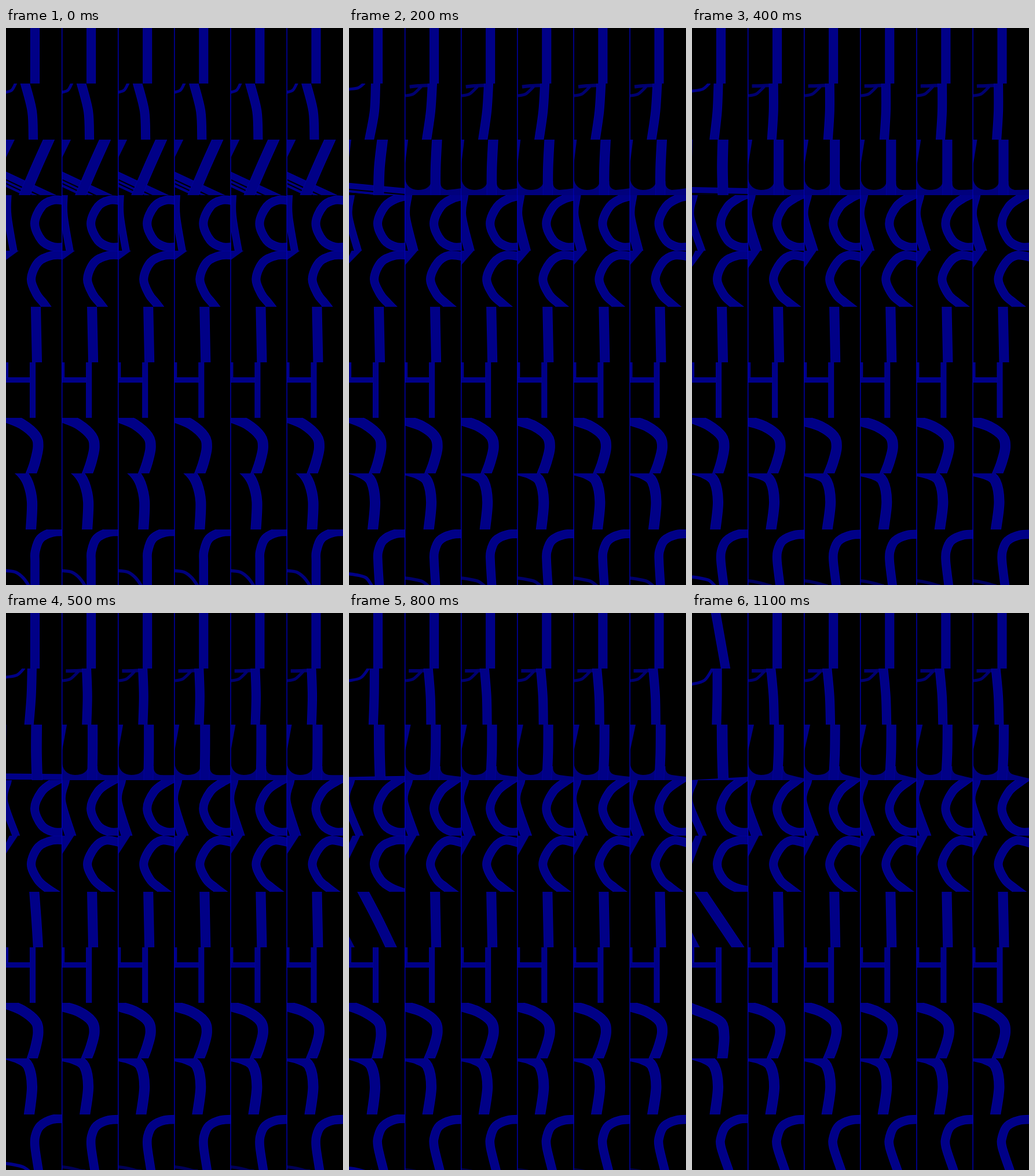
Recreate the animation shown at these times as an HTML page with a canvas. Size 582 by 963 pixels, loop 1.2 s.

```html
<!DOCTYPE html>
<html lang="en">
<head>
<meta charset="utf-8">
<title>Road tiles</title>
<style>
html, body { margin: 0; width: 100%; height: 100%; overflow: hidden; background: #000; }
canvas { display: block; width: 582px; height: 963px; }
</style>
</head>
<body>
<canvas id="stage" width="582" height="963"></canvas>
<script>
const ctx = document.getElementById('stage').getContext('2d');
const COLS = 6, CELL_W = 97.1, CELL_H = 96.3;
const STEP_MS = 100, STEPS = 12;
const BODY = '#000087', EDGE = '#00009c', DIM = '#00007c';
const FAST = 1, MEDIUM = 1.5, SLOW = 4; // settling times, in steps

let step = 0;
let real = true; // the first column moves freely, the others follow more stiffly

const pick = (free, stiff) => real ? free : stiff;

// Decays to a resting value; a kick makes it swing past on the way.
const settle = (from, to, time = MEDIUM, kick = 0) =>
  to + (from - to + kick * step) * Math.exp(-step / time);

const mix = (a, b, f) => a + (b - a) * f;

function smooth(start, length) {
  const u = Math.min(1, Math.max(0, (step - start) / length));
  return u * u * (3 - 2 * u);
}

// Smooth curve through the points.
function trace(p) {
  ctx.beginPath();
  ctx.moveTo(...p[0]);
  for (let i = 0; i < p.length - 1; i++) {
    const a = p[i - 1] || p[i], b = p[i], c = p[i + 1], d = p[i + 2] || c;
    ctx.bezierCurveTo(
      b[0] + (c[0] - a[0]) / 6, b[1] + (c[1] - a[1]) / 6,
      c[0] - (d[0] - b[0]) / 6, c[1] - (d[1] - b[1]) / 6, c[0], c[1]);
  }
}

function line(width, color, ...p) {
  trace(p);
  ctx.lineWidth = width;
  ctx.strokeStyle = color;
  ctx.stroke();
}

function road(width, ...p) {
  line(width, EDGE, ...p);
  line(width - 2, BODY, ...p);
}

// Road from top to bottom edge, running on past both.
function column(width, top, mid, low) {
  road(width, [top - (mid - top) * .2, -10], [top, 0], [mid, 48],
    [low, 96], [low + (low - mid) * .2, 106]);
}

function fill(color, path) {
  ctx.fillStyle = color;
  ctx.fill(new Path2D(path));
}

function soft(alpha, draw) {
  ctx.save();
  ctx.globalAlpha = alpha;
  ctx.filter = 'blur(0.7px)';
  draw();
  ctx.restore();
}

function straight() {
  const turn = pick(smooth(10, 1), 0);
  const top = mix(50, 41, turn), low = mix(50, 58, turn);
  column(16, top, (top + low) / 2, low);
}

function branch() {
  const x = settle(17, 29 + step * .65), y = settle(15, 5 + step * 2, FAST);
  const arc = (w, color) =>
    line(w, color, [-6, y + 1], [0, y], [x * .6, y * .75], [x, -1]);
  if (real || step === 0) {
    arc(5, BODY);
  } else {
    soft(.9, () => {
      line(6, DIM, [settle(12, 6), settle(10, 4)], [22, 4], [42, 3]);
      line(5, DIM, [0, 21], [14, 18], [28, 5]);
    });
  }
  column(16,
    pick(settle(33, 43.5, MEDIUM, 10), settle(33, 39, MEDIUM, 18)),
    settle(45, 43.5),
    pick(settle(47, 42.5, MEDIUM, -16), settle(47, 45, MEDIUM, -16)));
}

function crossing() {
  const side = pick(settle(15, 0), settle(15, 10, MEDIUM, -12));
  fill(BODY, `M0 0H${side}L0 ${pick(31, settle(31, 45))}Z`);
  if (real || step === 0) {
    const left = settle(68.5, 82 + step * 1.6, FAST);
    const right = settle(114, 94.5, 2, -13);
    const rise = (right - left) * .1;
    road(settle(24, 7, 3.3), [-10, left - rise], [107, right + rise]);
    for (const gap of [1 + step, 7.5 + step]) {
      line(2, '#000', [0, left + gap], [97, right + gap]);
    }
  } else {
    soft(1, () => fill(DIM, `M0 68Q3 86 22 87Q42 87 45 72H61
      Q60 85 72 87Q85 ${85 + step / 2} 97 ${82 + step}V98H0Z`));
  }
  column(pick(18.5, settle(18.5, 17)),
    pick(settle(74, 52), settle(74, 53, MEDIUM, -7)), 52.5,
    pick(settle(32, 54, FAST), settle(32, 50, MEDIUM, 13)));
}

function upperRing() {
  const foot = settle(13, pick(19, 15), SLOW);
  road(pick(13, settle(13, 19)), [5, -8], [3, 2],
    [settle(3, -6, SLOW), 36], [foot, 96], [foot + 3, 106]);
  road(15, [104, settle(10, -14, SLOW)], [82, settle(8.5, 2, SLOW)],
    [61.7, 19.7], [49.5, 49], [61.7, 78.3], [82, 89.5], [104, 89]);
}

function lowerRing() {
  const wide = 22 - step * .3;
  fill(BODY, `M0 0H${wide}L0 ${pick(16 + step * 3, settle(16, 38, SLOW))}Z`);
  if (real) fill('#000', `M0 0H${settle(0, 6)}L0 ${settle(0, 13)}Z`);
  const corner = pick([55.7, 19.7], [settle(55.7, 56), settle(19.7, 21)]);
  road(15, [104, pick(8, settle(8, 15, SLOW))], [pick(80, settle(80, 75)), 8],
    corner, [43.5, 49], [settle(53, 54.5), 75.5],
    [pick(64 + step, settle(64, 70)), 89.5],
    [pick(78 + step * 2.3, settle(78, 91)), pick(109 - step * 1.2, settle(108, 105))]);
}

function lean() {
  const swing = pick(smooth(4, 6), 0);
  const top = mix(51.5, 15, swing), low = mix(53.5, 79.5, swing);
  column(mix(17, 18.5, swing), top, mix(52.5, (top + low) / 2, swing), low);
  fill(BODY, `M0 ${mix(97, 70, swing)}L${14 * swing} 97H0Z`);
}

function ladder() {
  road(10, [-1, -5], [-1, 35]);
  road(9, [-5, 30.5], [45, 30.5]);
  road(10, [46, -5], [46, 102]);
}

function bow() {
  const sag = (step / (STEPS - 1)) ** 2;
  const start = pick(mix(-1, 10, sag), settle(-1, 6));
  const shoulder = pick(mix(11, 21, sag), settle(11, 15));
  const low = pick(mix(43, 52, sag), settle(43, 41, SLOW));
  const drop = pick(sag, .2);
  road(18, [-10, start - 4], [0, start], [28, shoulder], [51, 31 + 4 * drop],
    [55.5, 50 + 7 * drop], [(55 + low) / 2 + 1, 77], [low, 97], [low - 4, 106]);
}

function bend() {
  const x = settle(10, 0, FAST), y = settle(-14, pick(-7, -4), FAST);
  const elbow = settle(18, 13.5, FAST), low = settle(43, pick(39.5, 38.5), 2.5);
  road(18, [x - 8, y - 1], [x, y], [(x + 38) / 2 + 3, (y + elbow) / 2 - 3],
    [38.5, elbow], [45, 49], [low, 97], [low - 1, 106]);
}

function hook() {
  const low = 50 + step * 1.2;
  const rise = pick(71.5 + step * 2.7, settle(71.5, 83 + step * 1.6, FAST));
  const arc = () => line(5.5, pick(BODY, DIM),
    [-5, rise], [2, rise], [17, rise + 2.5], [30, Math.max(rise + 6, 84)], [40, 98]);
  if (real) arc();
  else soft(1 - step * .06, arc);
  const start = settle(4, pick(7.5, 9));
  road(15.5, [106, start - .5], [80, start + 1], [59, settle(16, 20)],
    [50.5, 38], [50, 56], [low, 96], [low + (low - 50) * .25, 106]);
}

const rows = [straight, branch, crossing, upperRing, lowerRing, lean, ladder, bow, bend, hook];

function render() {
  step = Math.floor(performance.now() / STEP_MS) % STEPS;
  ctx.fillStyle = '#000';
  ctx.fillRect(0, 0, 582, 963);
  rows.forEach((draw, r) => {
    const y = Math.round(r * CELL_H), h = Math.round((r + 1) * CELL_H) - y;
    for (let c = 0; c < COLS; c++) {
      real = c === 0;
      ctx.save();
      ctx.translate(c * CELL_W, y);
      ctx.beginPath();
      ctx.rect(0, 0, CELL_W, h);
      ctx.clip();
      draw();
      ctx.restore();
    }
  });
  ctx.fillStyle = '#0000b8';
  for (let c = 1; c < COLS; c++) ctx.fillRect(c * CELL_W - 1.1, 0, 1.4, 963);
  requestAnimationFrame(render);
}
render();
</script>
</body>
</html>
```
